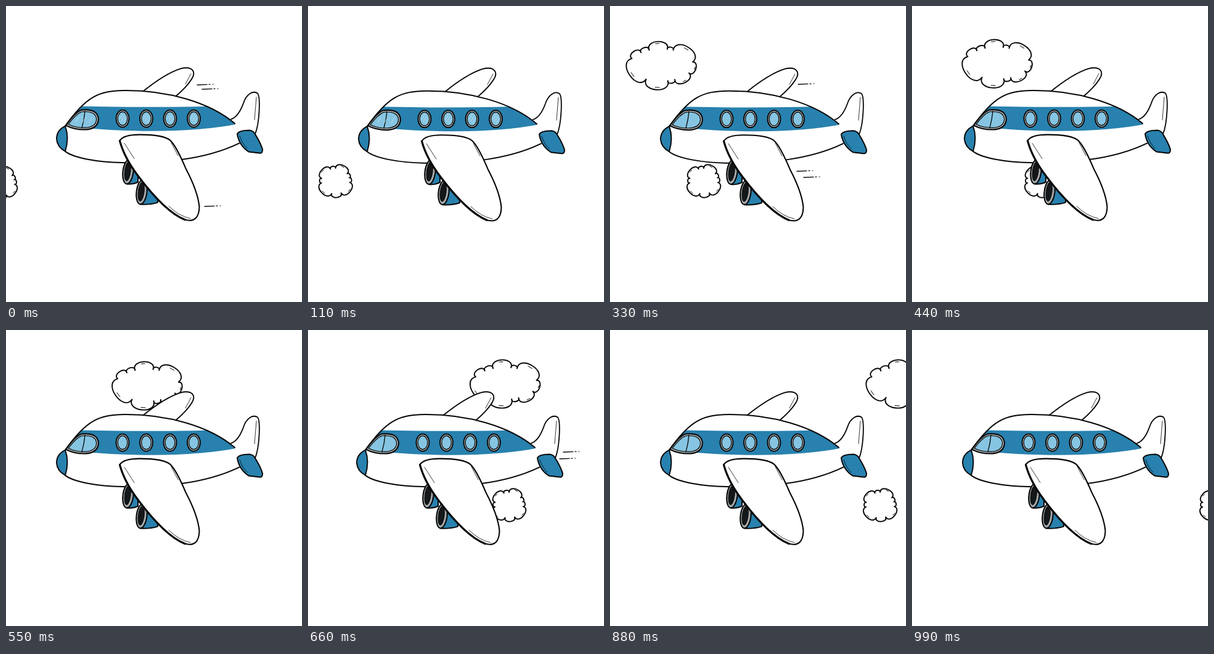
Animation, 480 px wide and 480 px high, one loop 1100 ms. Source, as an HTML page with a canvas:

```html
<!DOCTYPE html>
<html lang="en">
<head>
<meta charset="utf-8">
<title>Plane in the clouds</title>
<style>
html, body { margin: 0; height: 100%; overflow: hidden; background: #fff; }
canvas { display: block; width: 100vmin; height: 100vmin; }
</style>
</head>
<body>
<canvas id="stage" width="480" height="480"></canvas>
<script>
const ctx = document.getElementById('stage').getContext('2d');
const STEP = 110, STEPS = 10;
const INK = '#050505', BLUE = '#2881ae', SKY = '#86c5e2', GREY = '#a3a9ac', WHITE = '#fff', SHINE = '#c8e5f2';

const bodyTop = 'C130 146 150 137 192 136.5 C260 136 330 155 371 190';
const bodyLow = 'C320 250 250 254 188 253.5 C150 253 110 246 96 235';
const wingTop = 'M184.5 218 Q190 208 217 208 Q255 208 266 217 Q276 226 292 264 Q311 300 313.5 325 Q313 352 290 346';
const wingEdge = 'Q258 333 215 276 Q192 246 184.5 218';

const shape = {
  body: new Path2D(`M96 194 ${bodyTop} L378 222 ${bodyLow} Z`),
  bodyLine: new Path2D(`M96 194 ${bodyTop} M378 222 ${bodyLow}`),
  stripe: new Path2D('M90 161 Q250 166 380 160 V190 Q270 212 90 194 Z'),
  topWing: new Path2D('M222 138 Q258 109 283 101 C302 96 309 106 301 118 Q293 131 274 147'),
  fin: new Path2D('M365 183 Q377 179 385 157 C390 142 401 136 408 141 C413 148 411 190 404 207'),
  elevator: new Path2D('M375 207 Q378 201 395 201 Q402 202 405 209 Q413 222 416 232 Q416 239 411 238 L394 236 Q378 226 375 207 Z'),
  nose: new Path2D('M96 194 Q82 201 82 215 Q83 228 96 235 Q103 213 96 194 Z'),
  glass: new Path2D('M97 193 Q112 172 122 168 Q149 165 150 183 Q149 199 128 200 Q110 200 97 193 Z'),
  glassBar: new Path2D('M128 170 Q127 183 123 197'),
  wing: new Path2D(`${wingTop} ${wingEdge} Z`),
  wingEdge: new Path2D(`M290 346 ${wingEdge}`),
  details: new Path2D('M300 109 L291 126 M406 147 L403 184 M379 210 Q383 223 391 230 ' +
    'M192 222 L208 247 M264 324 Q280 340 299 344 M268 221 L279 242')
};

// Angles around an ellipse where the bumps of a cloud meet
const BIG = { rx: 52, ry: 26, cusps: [204, 231, 248, 281, 292, 349, 390, 425, 438, 478] };
const SMALL = { rx: 23, ry: 21, cusps: [192, 249, 270, 325, 345, 366, 427, 466, 532] };

// Cloud centres: step, x
const SMALL_KEYS = [[0, -9], [3, 152], [6, 326], [9, 494]];
const BIG_KEYS = [[3, 83], [4, 138], [6, 319.5], [8, 472]];

// Start of each speed dash by step
const DASHES = {
  0: [[310, 128], [318, 135], [322, 325]],
  2: [[418, 187], [426, 195], [315, 310]],
  3: [[305, 127], [303, 268], [314, 278]],
  6: [[414, 198], [408, 209]]
};

function along(keys, s) {
  const i = Math.max(1, keys.findIndex(k => k[0] >= s));
  const [a, b] = [keys[i - 1], keys[i]];
  return a[1] + (b[1] - a[1]) * (s - a[0]) / (b[0] - a[0]);
}

function paint(path, fill, width, color = INK) {
  if (fill) { ctx.fillStyle = fill; ctx.fill(path); }
  if (width) { ctx.strokeStyle = color; ctx.lineWidth = width; ctx.stroke(path); }
}

function line(x1, y1, x2, y2, width, color) {
  const p = new Path2D();
  p.moveTo(x1, y1);
  p.lineTo(x2, y2);
  paint(p, null, width, color);
}

function oval(x, y, rx, ry, fill, width, tilt = 0) {
  const p = new Path2D();
  p.ellipse(x, y, rx, ry, tilt, 0, Math.PI * 2);
  paint(p, fill, width);
}

function cloud(x, y, { rx, ry, cusps }) {
  const outline = new Path2D(), ticks = new Path2D();
  const pts = cusps.map(deg => {
    const a = deg * Math.PI / 180;
    return [x + rx * Math.cos(a), y + ry * Math.sin(a)];
  });
  outline.moveTo(...pts[0]);
  pts.forEach(([ax, ay], i) => {
    const [bx, by] = pts[(i + 1) % pts.length];
    const dx = bx - ax, dy = by - ay, bulge = 0.6, flare = 0.22;
    outline.bezierCurveTo(ax + dy * bulge - dx * flare, ay - dx * bulge - dy * flare,
      bx + dy * bulge + dx * flare, by - dx * bulge + dy * flare, bx, by);
    if (Math.hypot(dx, dy) > 18) {
      const tx = (ax + bx) / 2 + dy * 0.34, ty = (ay + by) / 2 - dx * 0.34;
      ticks.moveTo(tx - dx * 0.14, ty - dy * 0.14);
      ticks.lineTo(tx + dx * 0.06, ty + dy * 0.06);
    }
  });
  outline.closePath();
  paint(outline, WHITE, 1.9);
  paint(ticks, null, 1);
}

function engine(x, y, length) {
  const hull = new Path2D();
  hull.moveTo(x, y - 20);
  hull.lineTo(x + length, y - 14);
  hull.lineTo(x + length, y + 17);
  hull.quadraticCurveTo(x + length / 2, y + 21, x - 2, y + 20);
  paint(hull, BLUE, 2);
  oval(x, y, 8.5, 20, GREY, 2, 0.12);
  oval(x - 0.8, y - 0.5, 4.8, 15.5, '#15181a', 1, 0.12);
}

function porthole(x, shiny) {
  oval(x, 182, 10.5, 14, GREY, 1.8);
  oval(x, 182, 7.8, 11, SKY, 1.2);
  if (!shiny) return;
  for (let d = -3; d <= 3; d += 3) line(x + d - 2, 186 + d, x + d + 3, 178 + d, 0.7, SHINE);
}

function plane(shiny) {
  paint(shape.topWing, WHITE, 1.9);
  paint(shape.fin, WHITE, 1.8);

  ctx.save();
  ctx.clip(shape.body);
  paint(shape.body, WHITE);
  paint(shape.stripe, BLUE);
  ctx.restore();
  paint(shape.bodyLine, null, 2);

  paint(shape.glass, GREY, 2);
  ctx.save();
  ctx.translate(126, 184);
  ctx.scale(0.86, 0.8);
  ctx.translate(-126, -184);
  paint(shape.glass, SKY, 1.4);
  ctx.restore();
  paint(shape.glassBar, null, 1.3);
  for (let x = 113; shiny && x < 140; x += 11) line(x, 188, x + 5, 180, 0.7, SHINE);
  for (let i = 0; i < 4; i++) porthole(189 + 38.5 * i, shiny);

  paint(shape.nose, BLUE, 1.9);
  paint(shape.elevator, BLUE, 2);
  engine(198, 268, 16);
  engine(220, 301, 26);
  paint(shape.wing, WHITE, 2.1);
  paint(shape.wingEdge, null, 3.2);
  paint(shape.details, null, 0.8);
}

function dash([x, y]) {
  line(x, y, x + 16, y - 0.6, 1.3);
  line(x + 19, y - 0.8, x + 21, y - 0.8, 1.2);
  line(x + 25, y - 1, x + 26, y - 1, 1.2);
}

function draw(step) {
  ctx.fillStyle = WHITE;
  ctx.fillRect(0, 0, 480, 480);
  ctx.lineCap = ctx.lineJoin = 'round';

  cloud(along(SMALL_KEYS, step), 284 + Math.max(0, 3 - 3 * step), SMALL);
  if (step >= 3 && step <= 8) cloud(along(BIG_KEYS, step), Math.max(86.5, 105 - 3.1 * step), BIG);

  // A dip early on, then a nudge back and forth
  const dip = 0.6 + 4.4 * Math.exp(-2 * (step - 2) ** 2);
  const nudge = step >= 4 && step <= 6 ? 3 * (5 - step) : 0;
  ctx.save();
  ctx.translate(nudge, dip);
  plane(step < 3);
  ctx.restore();
  (DASHES[step] || []).forEach(dash);
}

const start = performance.now();
function tick() {
  draw(Math.floor((performance.now() - start) / STEP) % STEPS);
  requestAnimationFrame(tick);
}
tick();
</script>
</body>
</html>
```
